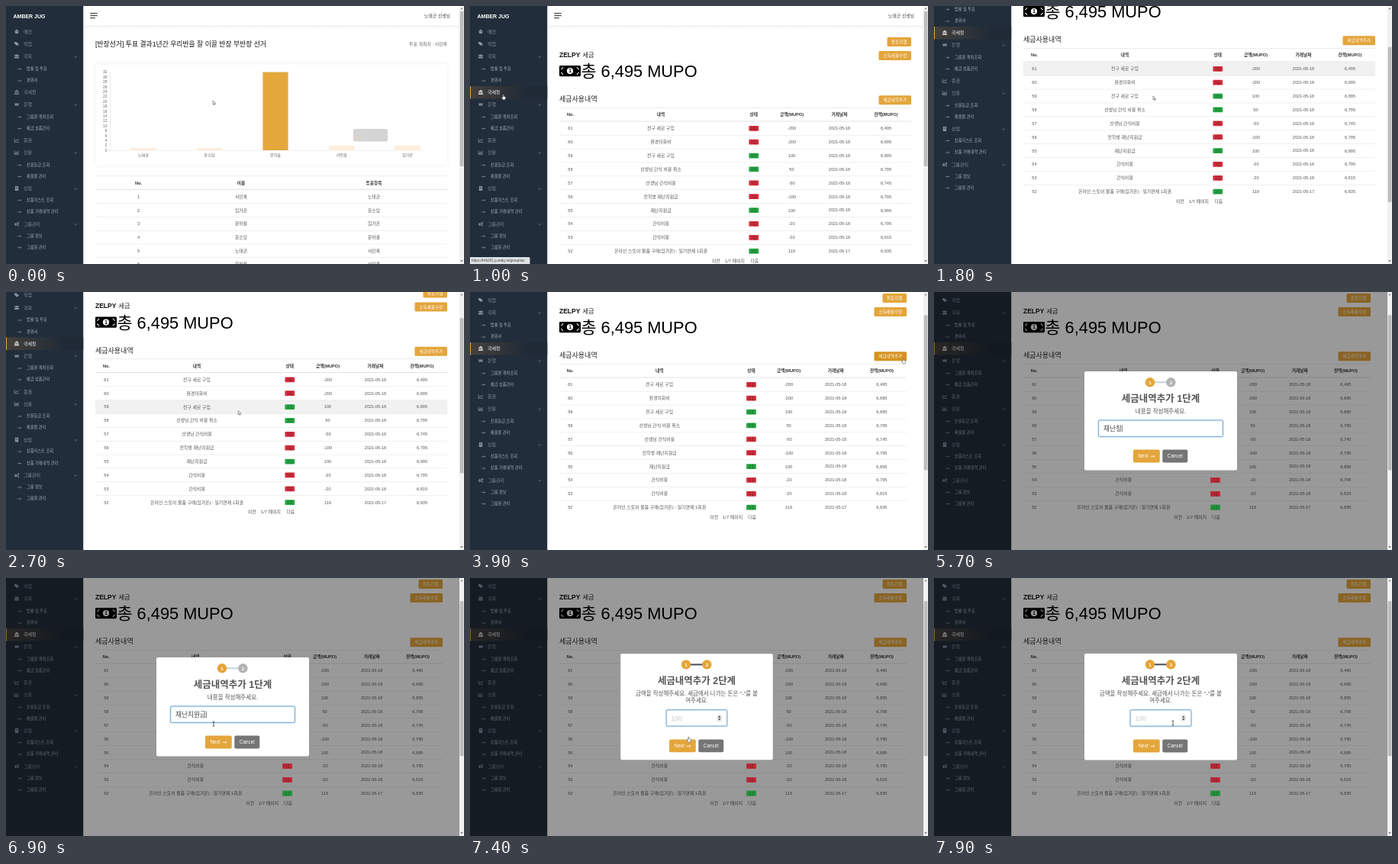
An HTML page with a canvas that plays this animation: 600x338 px, repeating every 8 s.

```html
<!DOCTYPE html>
<html lang="ko">
<head>
<meta charset="utf-8">
<title>Class bank dashboard</title>
<style>
html, body { margin: 0; width: 100%; height: 100%; overflow: hidden; background: #fff; }
canvas { display: block; }
</style>
</head>
<body>
<canvas id="stage" width="600" height="338"></canvas>
<script>
const g = document.getElementById('stage').getContext('2d');
const LOOP = 8000, STEP = 100;
const FONT = '"Liberation Sans", "Noto Sans CJK KR", "Noto Sans CJK JP", sans-serif';
const ORANGE = '#e4a53b', DARK_ORANGE = '#d6931f', SIDE = '#212d3b';
const PEOPLE = ['노태균', '윤소담', '문하율', '서민록', '임가온'];

// --- helpers ---
function text(s, x, y, size, color = '#555', align = 'left', weight = 400) {
  g.font = `${weight} ${size}px ${FONT}`;
  g.fillStyle = color;
  g.textAlign = align;
  g.fillText(s, x, y + size * 0.36);
}
function rect(x, y, w, h, color) {
  g.fillStyle = color;
  g.fillRect(x, y, w, h);
}
function box(x, y, w, h, r, color) {
  g.fillStyle = color;
  g.beginPath();
  g.roundRect(x, y, w, h, r);
  g.fill();
}
function disc(x, y, r, color) {
  g.fillStyle = color;
  g.beginPath();
  g.arc(x, y, r, 0, 7);
  g.fill();
}
function path(points, color, width) {
  g.beginPath();
  points.forEach(([x, y]) => g.lineTo(x, y));
  if (width) {
    g.strokeStyle = color;
    g.lineWidth = width;
    g.stroke();
  } else {
    g.fillStyle = color;
    g.fill();
  }
}
function at(keys, t) {
  let i = 0;
  while (i < keys.length - 2 && t >= keys[i + 1][0]) i++;
  const [a, b] = [keys[i], keys[i + 1]];
  const k = Math.min(1, Math.max(0, (t - a[0]) / (b[0] - a[0])));
  return a.slice(1).map((v, n) => v + (b[n + 1] - v) * k);
}
const inside = (p, x, y, w, h) => p.x >= x && p.x <= x + w && p.y >= y && p.y <= y + h;

// --- motion ---
const POINTER = [
  [0, 271, 124], [100, 268, 124], [400, 160, 121], [700, 60, 117], [900, 43, 116], [1100, 43, 116],
  [1300, 170, 119], [1500, 287, 118], [2100, 287, 118], [2900, 310, 168], [3200, 470, 93],
  [3300, 470, 93], [3800, 567, 87], [3900, 567, 87], [4200, 360, 172], [4500, 271, 176],
  [6600, 271, 176], [6900, 272, 191], [7100, 279, 213], [7300, 279, 213], [7800, 313, 190], [8000, 313, 190]
];
const SCROLL = [[1300, 0], [1500, 39], [1700, 78], [2200, 78], [2800, 39], [8000, 39]];
const POP = [[0, 0.7], [0.45, 1.05], [0.8, 0.95], [1, 1]];
const OPEN = 3920, SECOND = 7200;
const TYPED = ['ㅈ', '재', '잰', '재나', '재난', '재난ㅈ', '재난지', '재난징', '재난지우', '재난지워',
  '재난지원', '재난지원ㄱ', '재난지원그', '재난지원금'];
const keyTime = i => i < 4 ? 4800 + 100 * i : i < 10 ? 5000 + 100 * i : 5100 + 100 * i;

// --- sidebar ---
const ICONS = {
  home(y, c) { path([[10.8, y], [14, y - 3], [17.2, y]], c); rect(11.8, y, 4.4, 2.6, c); },
  tags(y, c) { path([[11, y - 2.6], [13.6, y - 2.6], [17, y + .6], [14.4, y + 2.8], [11, y - .2]], c); },
  users(y, c) {
    [[12, 1], [16, 1], [14, 1.4]].forEach(([x, r]) => disc(x, y - 1.2, r, c));
    box(10.8, y + .4, 6.4, 2.2, 1, c);
  },
  bank(y, c) {
    path([[11, y - 1.2], [14, y - 3], [17, y - 1.2]], c);
    [11.6, 13.5, 15.4].forEach(x => rect(x, y - .8, 1, 2.4, c));
    rect(11, y + 1.8, 6, 1, c);
  },
  won(y, c) { text('₩', 14, y, 6, c, 'center', 700); },
  line(y, c) {
    path([[11.2, y - 2.5], [11.2, y + 2.3], [17, y + 2.3]], c, .8);
    path([[12.2, y + .8], [13.8, y - .8], [15, y + .2], [16.8, y - 1.8]], c, .9);
  },
  bars(y, c) {
    path([[11.2, y - 2.5], [11.2, y + 2.3], [17, y + 2.3]], c, .8);
    [1.4, 3, 2, 3.8].forEach((h, i) => rect(12.1 + i * 1.2, y + 1.6 - h, .8, h, c));
  },
  shop(y, c) {
    rect(11.8, y - 3, 4.4, 6, c);
    for (let i = 0; i < 4; i++) rect(12.8 + i % 2 * 1.5, y - 2 + (i >> 1) * 1.6, .8, .8, SIDE);
  },
  cogs(y, c) {
    [[12.8, .6, 1.8], [16, -1.3, 1.2], [16, 1.8, 1.1]].forEach(([x, d, r]) => {
      disc(x, y + d, r, c);
      disc(x, y + d, r * .4, SIDE);
    });
  }
};
// icon, label, y, has submenu
const MENU = [
  ['home', '메인', 33.5], ['tags', '직업', 49.5], ['users', '국회', 66, 1],
  ['', '법률 및 투표', 82], ['', '경위서', 97.5], ['bank', '국세청', 113],
  ['won', '은행', 129, 1], ['', '그룹원 계좌조회', 145], ['', '예금 상품관리', 160],
  ['line', '증권', 176], ['bars', '신용', 192, 1], ['', '신용등급 조회', 208], ['', '제출물 관리', 223],
  ['shop', '상점', 239, 1], ['', '상품리스트 조회', 254], ['', '상품 거래내역 관리', 269.5],
  ['cogs', '그룹관리', 285.5, 1], ['', '그룹 정보', 301], ['', '그룹원 관리', 316]
];
function sidebar(active, p, scroll) {
  rect(0, 0, 101.25, 600, SIDE);
  text('AMBER JUG', 9.5, 13.2, 7, '#fff', 'left', 700);
  for (const [icon, label, y, sub] of MENU) {
    const on = active && label === '국세청';
    const hot = on || (p.x < 101 && Math.abs(p.y + scroll - y) < 7.8);
    if (on) {
      const shade = g.createLinearGradient(0, 0, 75, 0);
      shade.addColorStop(0, '#45413d');
      shade.addColorStop(1, '#202a36');
      rect(0, 105, 101.25, 16.5, shade);
      rect(0, 105, 1, 16.5, ORANGE);
    }
    const color = hot ? '#fff' : icon ? '#8793a0' : '#a9b2bc';
    if (icon) {
      ICONS[icon](y, color);
      text(label, 23, y, 6, color);
    } else {
      path([[15, y + .5], [19.6, y + .5]], color, .5);
      path([[18.4, y - .6], [19.7, y + .5], [18.4, y + 1.6]], color, .5);
      text(label, 26.8, y, 5.25, color);
    }
    if (sub) path([[89.6, y - .2], [91.2, y + 1.3], [92.8, y - .2]], '#8793a0', .7);
  }
}
function header() {
  const shade = g.createLinearGradient(0, 25, 0, 31);
  shade.addColorStop(0, 'rgba(60,70,90,.07)');
  shade.addColorStop(1, 'rgba(60,70,90,0)');
  rect(101.25, 25, 493, 6, shade);
  [[9.5, 9.5], [12.5, 9.5], [15.5, 6.5]].forEach(([y, w]) => rect(110.3, y - .5, w, 1.2, '#444'));
  text(PEOPLE[0] + ' 선생님', 582, 13, 5.9, '#444', 'right');
}

// --- vote page ---
function votePage(t) {
  text('[반장선거] 투표 결과1년간 우리반을 잘 이끌 반장 부반장 선거', 117, 50, 8.82, '#111');
  text('투표 개최자 : ' + PEOPLE[3], 578, 49.5, 5.9, '#666', 'right');

  g.save();
  g.shadowColor = 'rgba(60,70,90,.08)';
  g.shadowBlur = 6;
  box(117.5, 76.5, 460.5, 132, 2, '#fff');
  g.restore();
  for (let n = 0; n <= 32; n += 2) text(n, 132.5, 189 - n * 3.2, 5, '#666', 'right');
  rect(136, 86, .6, 106, '#ddd');
  rect(134, 188.8, 415, .6, '#e6e6e6');
  [1, 1, 32, 2, 2].forEach((n, i) => {
    const x = 179.8 + i * 86.6, h = n * 3.2;
    rect(x - 16.6, 189 - h, 33.2, h, i === 2 ? '#e4a83c' : '#fdeedc');
    text(PEOPLE[i], x, 195.5, 5.1, '#666', 'center');
  });
  const fade = Math.max(0, 1 - t / 250);
  if (fade) {
    g.globalAlpha = fade;
    box(455, 161, 45, 16.5, 2, '#d4d4d4');
    text(PEOPLE[3], 458, 165.5, 4.5, '#dfdbd4');
    rect(458, 170.5, 4, 4, '#e0d4c2');
    text('득표수: 2', 464, 172.5, 4.5, '#dfdbd4');
    g.globalAlpha = 1;
  }

  rect(117, 222.5, 461, .6, '#dde1e5');
  rect(117, 239.8, 461, 1, '#dde1e5');
  const cols = [173.5, 308, 482];
  ['No.', '이름', '투표항목'].forEach((s, i) => text(s, cols[i], 231.5, 5.7, '#333', 'center', 700));
  [[3, 0], [4, 1], [2, 4], [1, 2], [0, 3], [2, 3]].forEach(([a, b], i) => {
    const y = 249.8 + i * 17.7;
    [i + 1, PEOPLE[a], PEOPLE[b]].forEach((s, n) => text(s, cols[n], y, 5.8, '#555', 'center'));
    rect(117, y + 8.8, 461, .6, '#e3e6ea');
  });
}

// --- tax page ---
const ROWS = [
  ['전구 새로 구입', -200, '6,495'], ['환경미화비', -200, '6,695'], ['전구 새로 구입', 100, '6,895'],
  ['선생님 간식 비용 취소', 50, '6,795'], ['선생님 간식비용', -50, '6,745'], ['전학생 재난지원금', -100, '6,795'],
  ['재난지원금', 100, '6,895'], ['간식비용', -20, '6,795'], ['간식비용', -20, '6,815'],
  [`온라인 스토어 물품 구매(${PEOPLE[4]}) : 일기면제 1회권`, 119, '6,835']
];
const COLS = [131.5, 250, 371.8, 421.5, 484, 545];
const rowY = i => 160.2 + i * 17.88;

function badges(fit) {
  ROWS.forEach(([, sum], i) => {
    const x = fit(COLS[2]), y = rowY(i);
    box(x - 6.4, y - 3.3, 12.8, 6.8, 1.2, sum < 0 ? '#d4303f' : '#28a745');
    text(sum < 0 ? '지출' : '수입', x, y, 4.5, sum < 0 ? '#7c1420' : '#0d5a22', 'center');
  });
}
function button(label, right, y, w, color) {
  box(right - w, y, w, 12, 1.5, color);
  text(label, right - w / 2, y + 6, 5.6, '#fff', 'center');
}
function bill() {
  box(117, 78, 28, 14.2, 1.4, '#000');
  g.strokeStyle = '#fff';
  g.lineWidth = 1;
  [[119, 80, 0], [143, 80, 1], [143, 90.2, 2], [119, 90.2, 3]].forEach(([x, y, q]) => {
    g.beginPath();
    g.arc(x, y, 2.8, q * Math.PI / 2, (q + 1) * Math.PI / 2);
    g.stroke();
  });
  disc(131, 85.1, 4.1, '#fff');
  text('1', 131, 85.1, 6.5, '#000', 'center', 700);
}
function taxPage(right, fit, p, scroll, hoverScroll, modal) {
  text('ZELPY', 117, 63.6, 8.5, '#111', 'left', 700);
  text('세금', 147.5, 63.6, 8.2, '#222');
  bill();
  text('총 6,495 MUPO', 145.5, 85.2, 21.8, '#000');
  button('튜토리얼', right, 41, 31.5, ORANGE);
  button('소득세율수정', right, 59, 42.5, ORANGE);
  const hot = !modal && inside(p, right - 43, 116 - scroll, 43, 14);
  button('세금내역추가', right, 117.2, 42.5, hot ? DARK_ORANGE : ORANGE);
  text('세금사용내역', 117, 122, 9, '#222');

  const w = right - 117;
  rect(117, 133, w, .6, '#dde1e5');
  rect(117, 150.6, w, .9, '#dde1e5');
  ['No.', '내역', '상태', '금액(MUPO)', '거래날짜', '잔액(MUPO)'].forEach((s, i) =>
    text(s, fit(COLS[i]), 142, 5.65, '#333', 'center', 700));
  ROWS.forEach(([what, sum, left], i) => {
    const y = rowY(i), d = p.y + hoverScroll - y;
    if (!modal && p.x > 117 && p.x < right && d >= -8.94 && d < 8.94) rect(117, y - 8.6, w, 17.6, '#f1f1f1');
    if (i < 9) rect(117, y + 8.7, w, .6, '#e3e6ea');
    const put = (s, n, size) => text(s, fit(COLS[n]), y, size, '#555', 'center');
    put(61 - i, 0, 5.65);
    put(what, 1, 5.9);
    put(sum, 3, 5.65);
    put(i < 9 ? '2021-05-18' : '2021-05-17', 4, 5.55);
    put(left, 5, 5.65);
  });
  badges(fit);
  [['이전', 322.3], ['1/7 페이지', 347], ['다음', 372.8]].forEach(([s, x]) =>
    text(s, fit(x), 333.4, 5.9, '#555', 'center'));
}

// --- dialog ---
function dialog(t, p) {
  const second = t >= SECOND;
  const top = second ? 99 : 104, h = second ? 139.5 : 129.5;
  const [scale] = at(POP, (t - (second ? SECOND + 10 : OPEN)) / 300);
  g.save();
  g.translate(297, top + h / 2);
  g.scale(scale, scale);
  g.translate(-297, -top - h / 2);
  box(197, top, 200, h, 2, '#fff');

  const y = top + 14.3;
  rect(288, y - 1, 17, 2, second ? '#4c4c57' : '#c8d3da');
  disc(283, y, 6.2, ORANGE);
  disc(310.4, y, 6.2, second ? ORANGE : '#b3b3b3');
  text('1', 283, y, 6.2, '#fff', 'center', 700);
  text('2', 310.4, y, 6.2, '#fff', 'center', 700);
  text(`세금내역추가 ${second ? 2 : 1}단계`, 297, top + 35, 12.5, '#555', 'center', 700);
  if (second) {
    text('금액을 작성해주세요. 세금에서 나가는 돈은 "-"를 붙', 297, top + 52, 7.5, '#545454', 'center');
    text('여주세요.', 297, top + 61.5, 7.5, '#545454', 'center');
  } else {
    text('내용을 작성해주세요.', 297, top + 51.8, 7.5, '#545454', 'center');
  }

  const [ix, iy, iw] = second ? [257, 172.7, 80] : [215.5, 168, 163];
  g.beginPath();
  g.roundRect(ix, iy, iw, 21.5, 2);
  g.strokeStyle = '#d3e6f3';
  g.lineWidth = 2.4;
  g.stroke();
  g.strokeStyle = '#86b4d8';
  g.lineWidth = 1;
  g.stroke();
  const typed = TYPED.filter((s, i) => t >= keyTime(i)).pop();
  if (second) {
    text('100', 263.5, 183.5, 8.6, '#c6c6c6');
    box(323.5, 179, 6.5, 9, .5, '#ececec');
    path([[325, 182.7], [326.8, 180.4], [328.6, 182.7]], '#444');
    path([[325, 184.3], [326.8, 186.6], [328.6, 184.3]], '#444');
  } else if (typed) {
    text(typed, 222, 179, 8.7, '#444');
    rect(222.3 + g.measureText(typed).width, 174.5, .6, 9, '#333');
  } else {
    text('간식비용', 222, 179, 8.7, '#c6c6c6');
  }

  const by = top + h - 27;
  const hot = inside(p, 261, by, 35, 17);
  box(261, by, 34.8, 17, 2, hot ? DARK_ORANGE : ORANGE);
  box(299.3, by, 33, 17, 2, '#757575');
  text('Next', 267.5, by + 8.6, 6.4, '#fff');
  path([[283.4, by + 8.8], [289, by + 8.8]], '#fff', .7);
  path([[287.3, by + 7.3], [289, by + 8.8], [287.3, by + 10.3]], '#fff', .7);
  text('Cancel', 315.8, by + 8.6, 6.4, '#fff', 'center');
  g.restore();
}

// --- window parts ---
function scrollbar(scroll) {
  rect(594, 0, 6, 338, '#f1f1f1');
  rect(594.7, 7 + scroll * 0.6, 4.8, 203, '#bdbdbd');
  path([[595.4, 4.2], [597, 2.2], [598.6, 4.2]], '#777');
  path([[595.4, 333.2], [597, 335.2], [598.6, 333.2]], '#555');
}
function pointer(p, kind) {
  g.save();
  g.translate(p.x, p.y);
  g.lineJoin = 'round';
  if (kind === 'beam') {
    path([[-1.4, -3], [1.4, -3]], '#333', .7);
    path([[0, -3], [0, 3]], '#333', .8);
    path([[-1.4, 3], [1.4, 3]], '#333', .7);
  } else {
    const shape = kind === 'hand'
      ? [[0, 0], [1, 0], [1.2, 2.4], [3.6, 3], [3.6, 5], [2.8, 6.8], [.2, 6.8], [-1.8, 4], [-1.2, 3.4], [0, 4.2], [0, 0]]
      : [[0, 0], [0, 5], [1.2, 4], [2, 5.8], [2.8, 5.4], [2, 3.7], [3.6, 3.6], [0, 0]];
    path(shape, '#fff');
    path(shape, '#444', .55);
  }
  g.restore();
}

function draw(t) {
  const tax = t >= 1000, modal = t >= OPEN;
  const [x, y] = at(POINTER, t);
  const p = { x, y };
  const [scroll] = at(SCROLL, t);
  // Row hover is refreshed only once scrolling has settled.
  const hoverScroll = t >= 1500 && t < 1900 ? 39 : scroll;
  const right = t >= 3900 ? 572 : 578;
  const fit = v => 117 + (v - 117) * (right - 117) / 461;

  rect(0, 0, 600, 338, '#fff');
  g.save();
  g.translate(0, -scroll);
  header();
  if (tax) taxPage(right, fit, p, scroll, hoverScroll, modal);
  else votePage(t);
  sidebar(tax, modal ? { x: 300, y: 0 } : p, scroll);
  g.restore();

  if (modal) {
    const k = Math.min(1, (t - OPEN) / 150);
    rect(0, 0, 594, 338, `rgba(0,0,0,${0.4 * k})`);
    g.save();
    g.translate(0, -scroll);
    g.globalAlpha = 0.75;
    badges(fit);
    g.restore();
    dialog(t, p);
  }
  scrollbar(scroll);

  if (p.x < 101) {
    box(0, 329, 78.5, 9, [0, 1.5, 0, 0], '#dfe2e6');
    text('https://k4b201.p.zelpy.io/group/tax', 2, 333.7, 4.6, '#444');
  }
  const onField = modal && (t < SECOND ? inside(p, 215, 167, 164, 25) : inside(p, 256, 172, 82, 23));
  const onLink = p.x < 101 || (tax && !modal && inside(p, right - 43, 116 - scroll, 43, 14)) ||
    (modal && inside(p, 261, 206, 35, 23));
  if (t < 4800 || t >= 6700) pointer(p, onField ? 'beam' : onLink ? 'hand' : 'arrow');
}

const start = performance.now();
function tick() {
  const t = (performance.now() - start + 12) % LOOP;
  draw(Math.floor(t / STEP) * STEP);
  requestAnimationFrame(tick);
}
tick();
</script>
</body>
</html>
```
